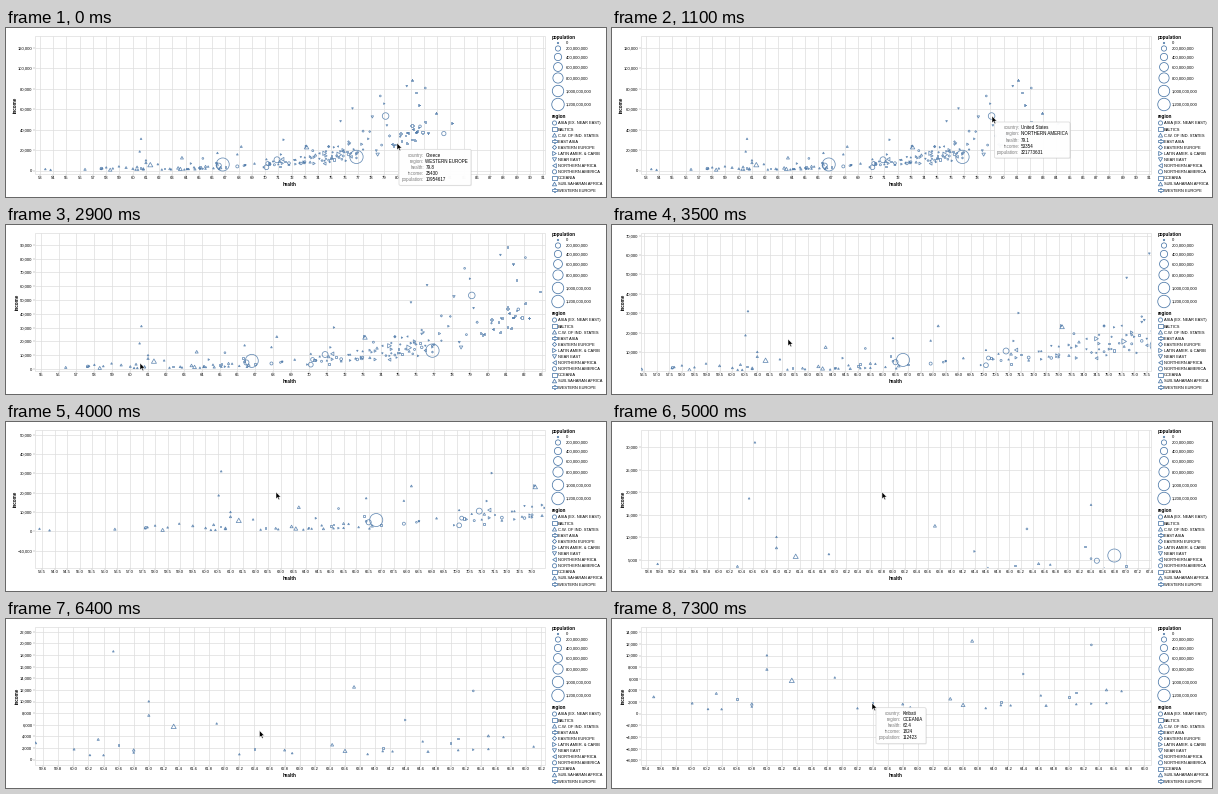
A matplotlib script for the animation above (7.4 s loop, 600 px wide and 169 px high).

```python
import math
import numpy as np
import matplotlib.pyplot as plt
from matplotlib.animation import FuncAnimation
from matplotlib.collections import LineCollection
from matplotlib.patches import FancyBboxPatch, Polygon, Rectangle
from matplotlib.path import Path

W, H, STEP, LOOP = 600, 169, 100, 7400
LEFT, RIGHT, TOP, BOTTOM = 29, 538.5, 8, 145.5
BLUE, GRID, TICK = "#4c78a8", "#dddddd", "#888888"
PT = 0.72  # points per pixel at 100 dpi

plt.rcParams["font.family"] = "Liberation Sans"
fig = plt.figure(figsize=(W / 100, H / 100), dpi=100, facecolor="white")
ax = fig.add_axes([0, 0, 1, 1])
ax.set_xlim(0, W)
ax.set_ylim(H, 0)
ax.axis("off")


def label(x, y, text="", size=4.1, **style):
    """Text centred vertically on the digits."""
    style = {"color": "black", "va": "baseline", **style}
    return ax.text(x, y + 0.36 * size, text, fontsize=size * PT, **style)


# ---- symbols ----
def shape(*points):
    return Path([*points, points[0]], closed=True)


def turned(points, quarter):
    for _ in range(quarter):
        points = [(-y, x) for x, y in points]
    return shape(*points)


TRIANGLE = [(0, 0.87), (-1, -0.87), (1, -0.87)]
CIRCLE = Path.unit_circle()
SQUARE = shape((-1, -1), (1, -1), (1, 1), (-1, 1))
DIAMOND = shape((0, -1), (1, 0), (0, 1), (-1, 0))
ARM = 0.4
CROSS = shape((-1, -ARM), (-1, ARM), (-ARM, ARM), (-ARM, 1), (ARM, 1), (ARM, ARM),
              (1, ARM), (1, -ARM), (ARM, -ARM), (ARM, -1), (-ARM, -1), (-ARM, -ARM))
UP, LEFTWARD, DOWN, RIGHTWARD = (turned(TRIANGLE, q) for q in range(4))

REGIONS = {
    "ASIA (EX. NEAR EAST)": CIRCLE, "BALTICS": SQUARE, "C.W. OF IND. STATES": UP,
    "EAST ASIA": CROSS, "EASTERN EUROPE": DIAMOND, "LATIN AMER. & CARIB": RIGHTWARD,
    "NEAR EAST": DOWN, "NORTHERN AFRICA": LEFTWARD, "NORTHERN AMERICA": CIRCLE,
    "OCEANIA": SQUARE, "SUB-SAHARAN AFRICA": UP, "WESTERN EUROPE": CROSS,
}


def symbols(x, y, radius, marker, **style):
    return ax.scatter(x, y, s=(2 * PT * np.asarray(radius)) ** 2, marker=marker,
                      facecolors="none", edgecolors=BLUE, linewidths=0.55, **style)


def radius_of(millions):
    return np.sqrt(0.5 + 0.032 * np.asarray(millions, float))


# ---- data: health, income in thousands, population in millions (default 7) ----
africa = [
    (53.4, 1.39), (53.8, .6), (56.4, 1.18, 28), (57.6, 1.68), (57.7, 2.19), (58, 3.05),
    (58.3, .81, 77), (58.5, 2.09), (58.96, 4.03), (59.5, 2.9, 23), (60.01, 1.8, 16),
    (60.22, .8), (60.33, 3.49, 23), (60.4, .78), (60.53, 18.63), (60.63, 31.09),
    (60.8, 1.23), (60.8, 1.68, 39), (61, 7.62, 25), (61, 10.04), (61.33, 5.73, 182),
    (61.9, 6.22), (62.2, .94), (62.8, 1.65, 18), (62.9, 1.13), (63.43, 2.57, 53),
    (63.6, 1.52, 99), (63.72, 12.51, 54), (63.9, .96), (64.1, 1.47), (64.23, 1.43),
    (64.63, 3.14), (64.7, 1.4, 24), (65.1, 1.64), (65.5, 1.83), (65.5, 4.1, 27),
    (65.7, 3.88), (66.1, 2.25), (66.4, 17.2), (66.53, 1.55), (66.63, 2.9, 46)]
asia = [
    (57.63, 1.93, 33), (65.3, 11.82), (66.4, 5.21), (66.5, 4.74, 189),
    (66.8, 5.9, 1311), (67.9, 4.01, 54), (70.1, 3.16, 161), (70.2, 6.88, 101),
    (70.9, 10.5, 258), (76.9, 13.33, 1376), (78.7, 73), (82.1, 80.79), (83.5, 36.16, 127)]
oceania = [(60.6, 2.53), (62.4, 1.824, 1), (64.1, 2.05), (65, 2.91), (65.1, 3.66),
           (66.3, 7.93), (67, 3.51), (80.6, 34.19)]
latin = [(64.4, 6.82), (65.3, 1.71), (71.4, 30.11), (75.6, 15.44, 208), (74.5, 16.85, 127)]
near_east = [(80.7, 82.63), (82, 132.88), (76.6, 60.75), (78.1, 52.47, 32),
             (75.7, 48.23), (79.2, 44.14), (78.5, 15.57, 79)]
west = [(81.1, 88.31), (81.6, 64.3), (82.9, 56.12), (81.1, 44.05, 81),
        (81.9, 37.6, 64), (79.8, 25.43, 11), (84.1, 46.58)]
known = {
    "SUB-SAHARAN AFRICA": africa, "ASIA (EX. NEAR EAST)": asia, "OCEANIA": oceania,
    "LATIN AMER. & CARIB": latin, "NEAR EAST": near_east, "WESTERN EUROPE": west,
    "NORTHERN AMERICA": [(79.1, 53.35, 322), (81.7, 43.29, 36)],
    "NORTHERN AFRICA": [(71.3, 11.03, 92), (76.5, 13.43, 40)],
    "C.W. OF IND. STATES": [(73.13, 23.04, 143), (68.2, 23.47, 18), (67.9, 15.87)],
}
# region: how many more, mean health, spread
crowd = {
    "LATIN AMER. & CARIB": (28, 74.8, 2.3), "EASTERN EUROPE": (15, 77, 1.5),
    "NEAR EAST": (8, 75.5, 3), "C.W. OF IND. STATES": (8, 71.3, 1.6),
    "ASIA (EX. NEAR EAST)": (13, 73.5, 3.4), "BALTICS": (3, 76, .6),
    "NORTHERN AFRICA": (3, 75.5, 1.5), "OCEANIA": (3, 71.8, .8),
    "SUB-SAHARAN AFRICA": (5, 71.5, 2.4), "WESTERN EUROPE": (17, 81.1, .8),
}
rng = np.random.default_rng(11)


def region_data(name):
    rows = [(*row, 7)[:3] for row in known.get(name, [])]
    count, mean, spread = crowd.get(name, (0, 0, 1))
    for _ in range(count):
        health = np.clip(rng.normal(mean, spread), 67.6, 82.8)
        trend = 1.8 + 0.165 * (health - 70)
        noise = 0.18 if name == "WESTERN EUROPE" else 0.42
        rows.append((round(health, 1), math.exp(rng.normal(trend, noise)),
                     rng.exponential(12)))
    return np.array(rows).reshape(-1, 3)


# ---- static parts ----
frame = ax.add_patch(Rectangle((LEFT, TOP), RIGHT - LEFT, BOTTOM - TOP, fill=False,
                               edgecolor=GRID, lw=0.5))
grid = ax.add_collection(LineCollection([], colors=GRID, linewidths=0.5, zorder=0.5))
ticks = ax.add_collection(LineCollection([], colors=TICK, linewidths=0.3, zorder=0.6))
x_labels = [label(0, 0, ha="center") for _ in range(60)]
y_labels = [label(0, 0, ha="right") for _ in range(24)]
label(283.5, 156, "health", 4.6, ha="center", weight="bold")
income_title = ax.text(9, 77, "income", fontsize=4.6 * PT, weight="bold", rotation=90,
                       ha="center", va="center")

label(546, 9, "population", 4.6, weight="bold")
for i, y in enumerate((15, 20.5, 29, 39, 50, 63, 76.5)):
    symbols([552], [y], radius_of([200 * i]), CIRCLE)
    label(560, y, f"{200_000_000 * i:,}")
label(546, 88, "region", 4.6, weight="bold")

clouds = []
for i, (name, marker) in enumerate(REGIONS.items()):
    y = 95 + 6.1 * i
    symbols([548.5], [y], [2.1], marker)
    label(552, y, name, 4.0)
    data = region_data(name)
    if len(data):
        cloud = symbols(data[:, 0], data[:, 1], radius_of(data[:, 2]), marker,
                        alpha=0.85, zorder=2)
        cloud.set_clip_path(frame)
        clouds.append((cloud, data))

# ---- tooltip and pointer ----
KEYS = ("country", "region", "health", "income", "population")
TIPS = [  # from, to, left, top, width, values
    (0, 100, 393, 121.3, 72, ("Greece", "WESTERN EUROPE", "79.8", "25430", "10954617")),
    (1000, 1200, 382.5, 94, 75.5,
     ("United States", "NORTHERN AMERICA", "79.1", "53354", "321773631")),
    (7300, LOOP, 264, 88.7, 50, ("Kiribati", "OCEANIA", "62.4", "1824", "112423")),
]


def make_tip(left, top, width, values):
    parts = []
    for offset, face, edge, alpha in ((0.8, "#000000", "none", 0.08), (0, "white", "#d5d5d5", 0.97)):
        parts.append(ax.add_patch(FancyBboxPatch(
            (left + offset, top + offset), width, 36,
            boxstyle="round,pad=0,rounding_size=1.2", facecolor=face, edgecolor=edge,
            lw=0.5, alpha=alpha, zorder=8)))
    for i, (key, value) in enumerate(zip(KEYS, values)):
        y = top + 5.8 + 6.05 * i
        parts.append(label(left + 25, y, key + ":", 4.5, color="#808080", ha="right", zorder=9))
        parts.append(label(left + 26.4, y, value, 4.5, zorder=9))
    return parts


tips = [(start, end, make_tip(*rest)) for start, end, *rest in TIPS]
ARROW = np.array([(0, 0), (0, 6.9), (1.6, 5.5), (2.6, 7.9), (3.7, 7.4), (2.7, 5.1), (4.8, 5.0)])
pointer = ax.add_patch(Polygon(ARROW, facecolor="black", edgecolor="white", lw=0.35, zorder=10))

# ---- motion ----
POINTER = np.array([
    (0, 391, 115), (500, 404, 58), (800, 395, 68), (1000, 381, 88), (1100, 380, 88),
    (1200, 375, 90), (1300, 375, 90), (1900, 118, 138), (2100, 134, 138), (3200, 134, 138),
    (3600, 190, 106), (4000, 270, 70), (5300, 270, 70), (5600, 258, 102), (6000, 267, 56),
    (6100, 267, 56), (6500, 249, 130), (6900, 261.5, 84), (7100, 260, 84)])
ZOOMS = [  # anchor, times, factors
    ((134, 138.2), (2100, 2300, 2400, 2500, 2600, 2700, 2800, 2900, 3000),
     (1, .996, 1, 1.04, 1.04, 1.12, 1.22, 1.351, 1.898)),
    ((270, 71.1), (4000, 4400, 4500, 4700, 4900, 5000, 5100),
     (1, 1.16, 1.16, 1.28, 1.28, 2.318, 3.003)),
]
DRAGS = [(3600, 4000, 79.2, -36.9), (5600, 6000, 9.5, -45.6), (6500, 6900, 12.1, -46)]
UNIT = np.array([13.24, -1.021])  # pixels per year and per thousand


def camera(t):
    """Pixel of (60 years, 0 income) and the zoom factor."""
    origin, scale = np.array([126.7, 142.5]), 1.0
    moves = [(times[0], "zoom", z) for z in ZOOMS for times in [z[1]]]
    moves += [(d[0], "drag", d) for d in DRAGS]
    for _, kind, move in sorted(moves, key=lambda m: m[0]):
        if kind == "zoom":
            anchor, times, factors = move
            factor = np.interp(t, times, factors)
            origin = anchor + (origin - anchor) * factor
            scale *= factor
        else:
            start, end, dx, dy = move
            origin = origin + np.clip((t - start) / (end - start), 0, 1) * np.array([dx, dy])
    return origin, scale


def nice_ticks(low, high, count):
    rough = (high - low) / count
    power = 10.0 ** math.floor(math.log10(rough))
    error = rough / power
    step = power * (10 if error >= 50 ** .5 else 5 if error >= 10 ** .5
                    else 2 if error >= 2 ** .5 else 1)
    return step, np.arange(math.ceil(low / step), math.floor(high / step) + 1) * step


def fill_labels(pool, places, texts):
    for item in pool:
        item.set_visible(False)
    for item, place, text in zip(pool, places, texts):
        item.set_visible(True)
        item.set_position(place)
        item.set_text(text)


def draw(number):
    t = number * STEP
    origin, scale = camera(t)
    unit = UNIT * scale
    for cloud, data in clouds:
        cloud.set_offsets(origin + (data[:, :2] - (60, 0)) * unit)

    x_step, years = nice_ticks(60 + (LEFT - origin[0]) / unit[0],
                               60 + (RIGHT - origin[0]) / unit[0], 35)
    _, incomes = nice_ticks((BOTTOM - origin[1]) / unit[1], (TOP - origin[1]) / unit[1], 9)
    xs = origin[0] + (years - 60) * unit[0]
    ys = origin[1] + incomes * unit[1]
    grid.set_segments([[(x, TOP), (x, BOTTOM)] for x in xs]
                      + [[(LEFT, y), (RIGHT, y)] for y in ys])
    ticks.set_segments([[(x, BOTTOM), (x, BOTTOM + 2)] for x in xs]
                       + [[(LEFT - 2, y), (LEFT, y)] for y in ys])
    digits = 0 if x_step >= 0.99 else 1
    fill_labels(x_labels, [(x, 150.7) for x in xs], [f"{v:.{digits}f}" for v in years])
    names = [f"{round(v * 1000):,}".replace("-", "\u2212") for v in incomes]
    fill_labels(y_labels, [(26.4, y + 1.5) for y in ys], names)
    income_title.set_x(9 if max(map(len, names)) > 6 else 11)

    for start, end, parts in tips:
        for part in parts:
            part.set_visible(start <= t < end)
    tip = [np.interp(t, POINTER[:, 0], POINTER[:, k]) for k in (1, 2)]
    pointer.set_xy(ARROW + tip)


animation = FuncAnimation(fig, draw, frames=LOOP // STEP, interval=STEP, repeat=True,
                          repeat_delay=0)
plt.show()
```
